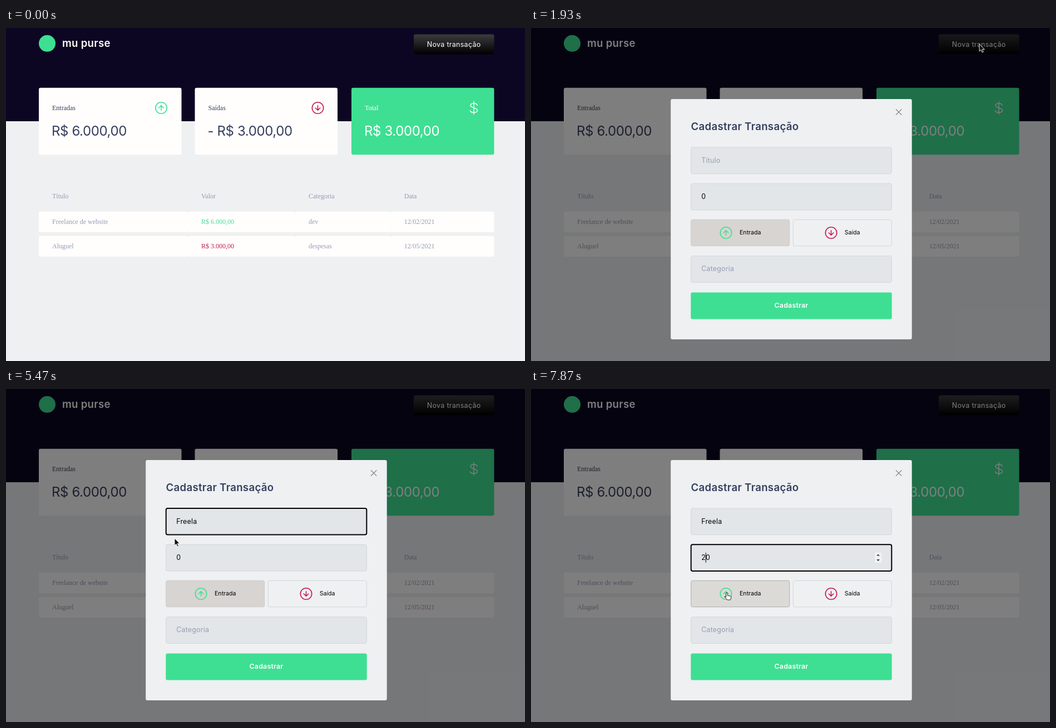
Animation of 933x600 px, one loop 8000 ms. Source, as an HTML page:

```html
<!DOCTYPE html>
<html lang="pt-BR">
<head>
<meta charset="utf-8">
<title>Transações</title>
<style>
  html, body { margin: 0; width: 100%; height: 100%; overflow: hidden; background: #eef0f2; }
  svg { display: block; width: 933px; height: 600px; }
  text { font: 12.4px Inter, Roboto, sans-serif; letter-spacing: .2px; white-space: pre; }
  .serif { font: 12px "Liberation Serif", "Times New Roman", serif; letter-spacing: 0; }
  .sum { font-size: 24px; letter-spacing: -.4px; }
  .brand { font-size: 18.6px; font-weight: 600; letter-spacing: .3px; }
  .heading { font-size: 18.6px; font-weight: 600; letter-spacing: .32px; }
  .bold { font-weight: 600; }
  .wide { font-size: 12.5px; letter-spacing: .28px; }
  .small { font-size: 10.6px; letter-spacing: 0; }
</style>
</head>
<body>
<svg id="stage" viewBox="0 0 933 600" xmlns="http://www.w3.org/2000/svg">
  <defs>
    <linearGradient id="shade" x1="0" y1="0" x2="0" y2="1">
      <stop stop-color="#3c3c3c"/><stop offset="1" stop-color="#000"/>
    </linearGradient>
  </defs>
  <g id="page"></g>
  <g id="modal"></g>
  <g id="pointer">
    <path id="arrow" d="M0 0V13L3 10.3L5.1 15L7.3 14L5.2 9.5H9.2Z" fill="#111" stroke="#fff" stroke-width=".9"/>
    <path id="hand" d="M-1.3 8.5V1.2a1.3 1.3 0 0 1 2.6 0V5.2l5 .8q1.6 .4 1.5 2l-.6 3.2-.8 1.8H1L-4 8q-.5-1.4 .9-1.4z" fill="#fff" stroke="#111" stroke-width=".9"/>
    <path id="beam" d="M-2.5 -5.5H-.8L0 -5L.8 -5.5H2.5M0 -5V5M-2.5 5.5H-.8L0 5L.8 5.5H2.5" fill="none" stroke="#222"/>
  </g>
</svg>
<script>
const NS = 'http://www.w3.org/2000/svg';
const LOOP = 8000, STEP = 200 / 3;
const INK = '#363f5f', MUTED = '#969cb3', GREEN = '#3edf93', RED = '#c8174c', CARD = '#fffefd';
const $ = id => document.getElementById(id);

let layer = $('page');
function add(tag, attrs) {
  const el = document.createElementNS(NS, tag);
  for (const key in attrs) el.setAttribute(key, attrs[key]);
  return layer.appendChild(el);
}
const box = (x, y, width, height, fill, rx = 3, more = {}) =>
  add('rect', { x, y, width, height, fill, rx, ...more });
function label(x, y, words, fill, cls = '', anchor = 'start') {
  const el = add('text', { x, y, fill, class: cls, 'text-anchor': anchor });
  el.textContent = words;
  return el;
}
const line = (d, stroke, width = 1.5) => add('path', {
  d, stroke, fill: 'none', 'stroke-width': width, 'stroke-linecap': 'round', 'stroke-linejoin': 'round'
});
function arrowIcon(x, y, color, dir) {
  add('circle', { cx: x, cy: y, r: 10.2, fill: 'none', stroke: color, 'stroke-width': 1.6 });
  line(`M${x} ${y - 4.3 * dir}V${y + 4.3 * dir}M${x - 4.3} ${y}L${x} ${y + 4.3 * dir}L${x + 4.3} ${y}`, color, 1.6);
}
const show = (el, on) => el.setAttribute('visibility', on ? 'visible' : 'hidden');

// Page
box(0, 0, 933, 600, '#eef0f2', 0);
box(0, 0, 933, 168, '#0d0623', 0);
add('circle', { cx: 74, cy: 27.8, r: 15, fill: GREEN });
label(101, 34, 'mu purse', '#fff', 'brand');
const newButton = box(733, 11.5, 144.5, 35.8, 'url(#shade)');
label(805.2, 34, 'Nova transação', '#fff', 'wide', 'middle');

[
  [59, 'Entradas', 'R$ 6.000,00', CARD, INK],
  [339.5, 'Saídas', '- R$ 3.000,00', CARD, INK],
  [621, 'Total', 'R$ 3.000,00', GREEN, '#fff']
].forEach(([x, name, sum, fill, ink]) => {
  box(x, 107.8, 256.5, 120.4, fill);
  label(x + 24, 148, name, ink, 'serif');
  label(x + 23, 194, sum, ink, 'sum');
});
arrowIcon(279, 144, GREEN, -1);
arrowIcon(560.5, 144, RED, 1);
line('M841 132.5V155.5M847.2 139.3C846.5 134.8 835 134.8 835 139.6S847.6 143.6 847.6 148.6 834.6 153.2 834.4 148.6', '#fff', 1.4);

const columns = [59, 327, 520, 691.8, 877.5];
const rows = [
  ['Título', 'Valor', 'Categoria', 'Data'],
  ['Freelance de website', 'R$ 6.000,00', 'dev', '12/02/2021'],
  ['Aluguel', 'R$ 3.000,00', 'despesas', '12/05/2021']
];
rows.forEach((cells, r) => cells.forEach((words, c) => {
  const x = columns[c], y = [307, 353, 397][r];
  if (r) box(x, y - 22.3, columns[c + 1] - x, 37.4, CARD);
  label(x + 24, y, words, r && c === 1 ? [GREEN, RED][r - 1] : MUTED, 'serif');
}));

// Dialog
layer = $('modal');
box(0, 0, 933, 600, 'rgba(0,0,0,.5)', 0);
box(251.2, 128, 433.5, 433, '#eef0f2', 3);
line('M656.3 146.7L665.9 156.3M665.9 146.7L656.3 156.3', '#8c8c90', 1.3);
label(287.5, 183.5, 'Cadastrar Transação', INK, 'heading');

const EDGE = { stroke: '#d3d6d9', 'stroke-width': 1 };
const field = y => box(287.7, y, 360.6, 47.6, '#e2e6e9', 3, EDGE);
const titleBox = field(215), valueBox = field(280.3);
field(410.7);
const titleText = label(306.3, 243, '', '#000');
const valueText = label(306.3, 308, '', '#000');
label(306.3, 438, 'Categoria', MUTED);
const incomeBox = box(287.7, 345.3, 177, 47.4, '#d7d4d1', 3, EDGE);
box(471.3, 345.3, 177, 47.4, 'none', 3, EDGE);
arrowIcon(350.5, 369, GREEN, -1);
arrowIcon(539.5, 369, RED, 1);
label(375, 372, 'Entrada', '#000', 'small');
label(563.8, 372, 'Saída', '#000', 'small');
box(287.3, 476.5, 361.4, 48, GREEN);
label(468, 504.3, 'Cadastrar', '#fff', 'bold', 'middle');
const spinner = layer.appendChild(document.createElementNS(NS, 'g'));
layer = spinner;
box(618, 294.5, 12.5, 18.5, '#f1f1f1', 1.5);
add('path', { d: 'M621.3 300.6H626.9L624.1 297.4ZM621.3 307H626.9L624.1 310.2Z', fill: '#333' });
layer = $('modal');
const caret = box(0, 0, 1, 18, '#000', 0);

// Pointer path: time, x, y, and whether it glides from the row before
const path = [
  [270, 363, 201], [400, 423, 238], [600, 590, 260], [730, 756, 226],
  [870, 795, 150], [930, 827, 94], [1000, 827, 94],
  [1270, 814, 44, 1], [1530, 806, 29, 1], [2000, 805, 29.5],
  [2470, 500, 190, 1], [2730, 386, 243, 1], [3270, 386, 243],
  [3600, 303, 269, 1], [5800, 303, 269],
  [6270, 311, 302, 1], [6670, 318, 313, 1], [6730, 334, 346],
  [6930, 352, 367, 1]
];
const typed = [[0, 'Título'], [4000, 'F'], [4200, 'Fr'], [4330, 'Fre'], [4730, 'Free'], [4870, 'Freela']];
// Caret: time, field (0 none, 1 title, 2 value), characters to its left
const carets = [
  [0, 0, 0], [2870, 1, 0], [3330, 0, 0], [4000, 1, 1], [4200, 1, 2], [4330, 1, 3],
  [4730, 1, 4], [4870, 1, 6], [5470, 0, 0], [6400, 2, 0],
  [7400, 2, 1], [7600, 2, 0], [7870, 2, 1]
];
const lastAt = (table, t) => table.filter(row => row[0] <= t).pop();

function pointerAt(t) {
  const i = path.filter(p => p[0] <= t).length - 1;
  if (i < 0) return null;
  const [t0, x0, y0] = path[i], next = path[i + 1];
  if (!next || !next[3]) return [x0, y0];
  const k = (t - t0) / (next[0] - t0);
  return [x0 + (next[1] - x0) * k, y0 + (next[2] - y0) * k];
}
const inside = (p, x, y, w, h) => p && p[0] >= x && p[0] <= x + w && p[1] >= y && p[1] <= y + h;

function setFocus(el, on) {
  el.setAttribute('stroke', on ? '#000' : EDGE.stroke);
  el.setAttribute('stroke-width', on ? 2 : 1);
}

function draw(t) {
  const open = t >= 1930;
  const tick = Math.floor((t + 6) / STEP) * STEP;
  const p = pointerAt(Math.max(t < 270 ? 0 : 270, tick + 4));
  const overNew = !open && inside(p, 733, 11, 144, 36);
  const overField = open && (inside(p, 287, 214, 362, 49) || inside(p, 287, 280, 362, 48));
  const overIncome = open && inside(p, 287, 345, 178, 48);
  const kind = overNew || overIncome ? 'hand' : overField ? 'beam' : 'arrow';

  show($('pointer'), p);
  if (p) $('pointer').setAttribute('transform', `translate(${p[0]} ${p[1]})`);
  for (const id of ['arrow', 'hand', 'beam']) $(id).style.display = id === kind ? '' : 'none';
  newButton.style.filter = overNew || (open && t < 2070) ? 'brightness(.84)' : '';

  $('modal').style.display = open ? '' : 'none';
  if (!open) return;

  titleText.textContent = lastAt(typed, t)[1];
  titleText.setAttribute('fill', t < 4000 ? MUTED : '#000');
  valueText.textContent = t < 7870 ? '0' : '20';
  setFocus(titleBox, t >= 2870 && t < 6400);
  setFocus(valueBox, t >= 6400);
  show(spinner, t >= 6400 || inside(p, 287, 280, 362, 48));

  const hover = overIncome && t >= 6800;
  incomeBox.setAttribute('fill', hover ? '#dcdad7' : '#d7d4d1');
  incomeBox.setAttribute('stroke', hover ? '#b0aeac' : '#cecccb');

  const [, where, count] = lastAt(carets, t);
  show(caret, where);
  if (where) {
    const el = where === 1 ? titleText : valueText;
    caret.setAttribute('x', 306 + (count ? el.getSubStringLength(0, count) : 0));
    caret.setAttribute('y', where === 1 ? 230 : 295);
  }
}

const start = performance.now();
function frame() {
  draw((performance.now() - start) % LOOP);
  requestAnimationFrame(frame);
}
frame();
</script>
</body>
</html>
```
